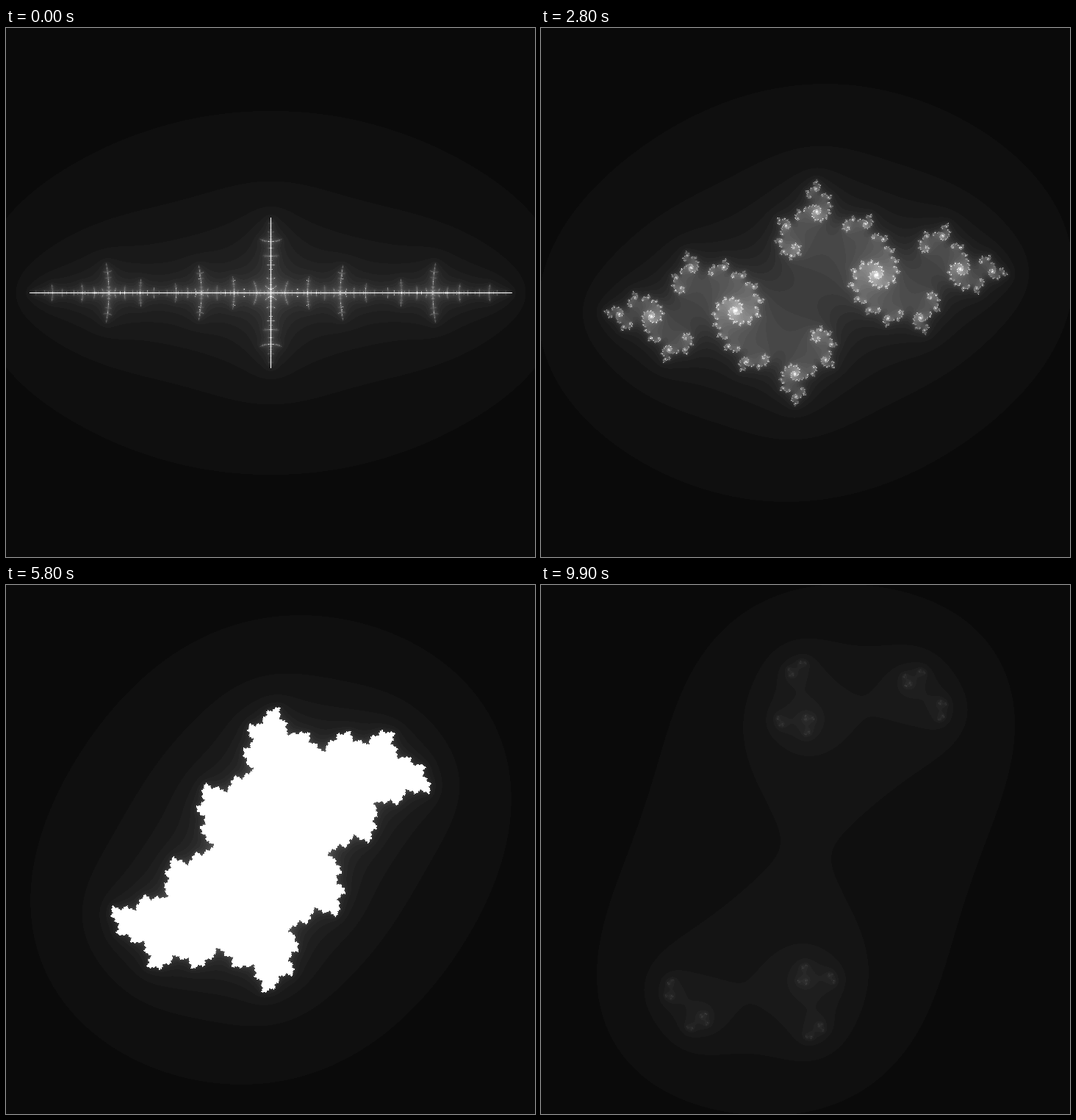
These frames come from a looping animation (720x720 px, 10 s). An HTML page with a canvas:

```html
<!DOCTYPE html>
<html lang="en">
<head>
<meta charset="utf-8">
<title>Julia set</title>
<style>
  html, body { margin: 0; width: 100%; height: 100%; overflow: hidden; background: #0a0a0a; }
  canvas { position: absolute; left: 0; top: 0; display: block; }
</style>
</head>
<body>
<canvas id="view"></canvas>
<script>
const STEPS = 100, STEP_MS = 100;
const CENTER = 360, UNIT = 180;
const SIZE = 2 * CENTER + 1; // odd, so the centre falls on a pixel
const MAX_ITER = 50, LIMIT = 10 * 10;

const canvas = document.getElementById('view');
canvas.width = canvas.height = SIZE;
const ctx = canvas.getContext('2d');
const image = ctx.createImageData(SIZE, SIZE);
const pixels = new Uint32Array(image.data.buffer);

const shades = Uint32Array.from({ length: MAX_ITER + 1 }, (_, n) =>
  0xff000000 | Math.floor(n * 255 / MAX_ITER) * 0x010101);

function escapeCount(x, y, cx, cy) {
  let n = 0, xx = x * x, yy = y * y;
  while (n < MAX_ITER && xx + yy <= LIMIT) {
    y = 2 * x * y + cy;
    x = xx - yy + cx;
    xx = x * x;
    yy = y * y;
    n++;
  }
  return n;
}

function draw(step) {
  const p = step / STEPS;
  const cx = -1.5 + 2.5 * p, cy = p;
  const last = pixels.length - 1;
  // The set is symmetric about the origin: compute half, mirror the rest.
  for (let k = 0; k <= last / 2; k++) {
    const x = (k % SIZE - CENTER) / UNIT;
    const y = (Math.floor(k / SIZE) - CENTER) / UNIT;
    pixels[k] = pixels[last - k] = shades[escapeCount(x, y, cx, cy)];
  }
  ctx.putImageData(image, 0, 0);
}

let shown = -1;
function tick() {
  const step = Math.floor(performance.now() / STEP_MS) % STEPS;
  if (step !== shown) draw(shown = step);
  requestAnimationFrame(tick);
}
tick();
</script>
</body>
</html>
```
